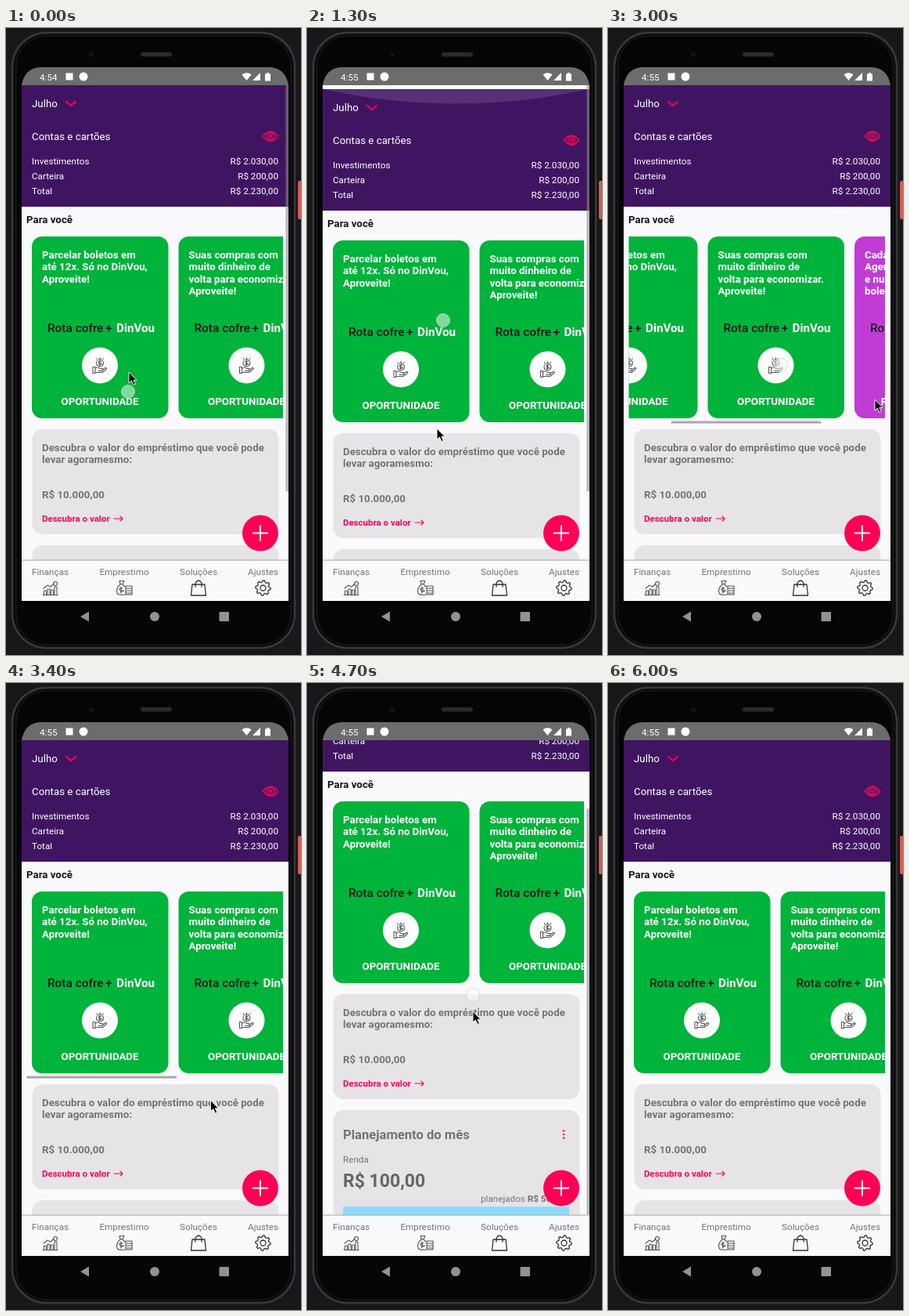
Recreate the animation shown at these times as an HTML page. Size 377x800 px, loop 6100 ms.

```html
<!DOCTYPE html>
<html lang="pt">
<head>
<meta charset="utf-8">
<style>
html, body { margin: 0; height: 100%; overflow: hidden; background: #19171a; }
svg { display: block; width: 100vw; height: 100vh; }
text { font: 11.7px Roboto, sans-serif; fill: #747474; white-space: pre; }
.white text { fill: #fff; }
.m { font-size: 13.3px; }
.b, .card text { font-size: 13.3px; font-weight: 700; }
.card text { fill: #fff; }
.card .brand { font-size: 15.2px; }
.card .dark { font-size: 15.4px; font-weight: 500; fill: #14181a; }
.mid { text-anchor: middle; }
.end { text-anchor: end; }
.line { fill: none; stroke: #555; stroke-width: 1.1; stroke-linejoin: round; stroke-linecap: round; }
.pink { stroke: #f05; }
</style>
</head>
<body>
<svg viewBox="0 0 377 800">
  <defs>
    <clipPath id="page"><rect x="20" y="73" width="341" height="606"/></clipPath>
    <clipPath id="strip"><rect x="26.5" y="260" width="327.5" height="250"/></clipPath>
    <g id="hand" class="line">
      <circle cy="-3" r="4.5"/>
      <path d="M0-10V-8M-4-9V-8M4-9V-8M1.5-5Q-1.5-6-1.5-4T1.5-2T-1.5-1M0-6V0M-9 2h3v8h-3zM-6 4Q-2 1 0 4h3q2 2-1 3h-4M3 6l4-3q3 0 1 2L3 9H-6"/>
    </g>
  </defs>

  <!-- phone body -->
  <rect x="373" y="195" width="6" height="49" rx="2" fill="#d65a56"/>
  <rect x="8" y="6" width="361" height="785" rx="44" fill="#0c0b0d" stroke="#39383b" stroke-width="2.5"/>
  <rect x="13" y="10" width="351" height="777" rx="39" fill="#050506" stroke="#1d1c1f"/>
  <rect x="172" y="31" width="40" height="5.5" rx="2.7" fill="#2a292b"/>
  <circle cx="109" cy="34" r="3" fill="#121215"/>

  <!-- screen -->
  <path d="M20 80V73Q24 50 46 50H335Q357 50 361 73V80z" fill="#6c6c6c"/>
  <g clip-path="url(#page)">
    <rect x="20" y="73" width="341" height="606" fill="#faf9fc"/>
    <g id="content">
      <g class="white">
        <rect x="20" y="73" width="341" height="155" fill="#3f1562"/>
        <text x="33" y="101" class="m">Julho</text>
        <path d="M77 94l6 5 6-5" class="line pink" style="stroke-width:2"/>
        <text x="33" y="143" class="m">Contas e cartões</text>
        <g class="line pink" style="stroke-width:1.5">
          <path d="M328.500 138Q338 126 347.500 138Q338 150 328.500 138z"/>
          <circle cx="338" cy="138" r="4.500"/><circle cx="338" cy="138" r="1.500"/>
        </g>
        <g id="rows"></g>
      </g>
      <text x="26" y="249" class="b" style="fill:#16161a">Para você</text>
      <g clip-path="url(#strip)"><g id="cards"></g></g>
      <rect id="hbar" y="501.500" width="191.500" height="3" fill="#a9a9ab"/>

      <g fill="#e6e4e7">
        <rect x="33.500" y="512" width="315" height="134" rx="13"/>
        <rect x="33.500" y="660" width="315" height="200" rx="13"/>
      </g>
      <text x="46" y="539.500" class="b">Descubra o valor do empréstimo que você pode</text>
      <text x="46" y="555" class="b">levar agoramesmo:</text>
      <text x="46" y="599.500" class="b">R$ 10.000,00</text>
      <text x="46" y="629.500" class="b" style="font-size:11.5px;fill:#f05">Descubra o valor</text>
      <path d="M138 626h11m-3-3l3 3-3 3" class="line pink"/>

      <text x="46" y="697" class="b" style="font-size:16.600px">Planejamento do mês</text>
      <g fill="#f05"><circle cx="328" cy="686.500" r="1.300"/><circle cx="328" cy="691" r="1.300"/><circle cx="328" cy="695.500" r="1.300"/></g>
      <text x="46" y="727">Renda</text>
      <text x="46" y="758" class="b" style="font-size:23px;fill:#666">R$ 100,00</text>
      <text x="222" y="777">planejados <tspan font-weight="700">R$ 500,00</tspan></text>
      <rect x="46" y="783" width="289" height="20" fill="#8edbfb"/>
    </g>
    <path id="glow" d="M20 78H361Q190 115 20 78z" fill="#fff" opacity=".12"/>
    <rect id="vbar" x="357.500" width="3.500" height="518" fill="#8a8a8e" opacity=".6"/>
  </g>

  <!-- status bar -->
  <g class="white" fill="#fff">
    <text id="clock" x="43" y="66.500" font-weight="500"></text>
    <rect x="76.500" y="57.500" width="9" height="9"/>
    <circle cx="99" cy="62" r="5.500"/>
    <path d="M301.500 59.500Q307.500 55 313.500 59.500L307.500 67zM325 57V67H315z"/>
    <path d="M331 58.500h2v-1.500h3v1.500h2V67.500h-7z"/>
  </g>

  <!-- floating button and tab bar -->
  <circle cx="325" cy="644.500" r="23" fill="#f05"/>
  <path d="M315 644.500h20M325 634.500v20" stroke="#fff" stroke-width="2"/>
  <rect x="20" y="679" width="341" height="52" fill="#faf9fc"/>
  <path d="M20 679H361" stroke="#a5a5a8"/>
  <g id="tabs" class="mid"></g>
  <g class="line">
    <path d="M47 723.500h19M48.500 723v-5h3v5M53 723v-7h3v7M57.500 723v-6h3v6M62 723v-10h3v10M48 715l5-4 4 2 4-4"/>
    <circle cx="63" cy="709" r="2.500"/>
    <path d="M145 705.500h6l-2 4h-3zM146 710q-6 5-4 11q1 3 10 2M149 710l3 3M147 713v8m2-6q-4-1-4 1t4 2t-3 1.500"/>
    <path d="M153 712h8v11h-8zM153 715h8M153 718h8M153 721h8"/>
  </g>
  <g class="line" style="stroke:#333;stroke-width:1.300">
    <path d="M238 710h16l1.500 14h-19zM242 713v-5q4-6 8 0v5"/>
    <circle cx="328.500" cy="714.500" r="3.500"/>
    <path id="gear"/>
  </g>
  <g fill="#929292">
    <path d="M95 751l11-6.500v13z"/><circle cx="190" cy="751" r="6"/><rect x="272.500" y="745" width="12.500" height="12" rx="1"/>
  </g>

  <circle id="touch" r="8.500" fill="#fff" fill-opacity=".5" stroke="#c9d6cf" stroke-opacity=".8"/>
  <path id="cursor" d="M0 0V14L3.300 11L6 16.500L8.300 15.500L5.800 10.300H10z" fill="#000" stroke="#fff" stroke-width=".9"/>
</svg>
<script>
const $ = id => document.getElementById(id);
const LOOP = 6100, STEP = 100;

$('rows').innerHTML = [['Investimentos', '2.030'], ['Carteira', '200'], ['Total', '2.230']].map(([name, sum], i) =>
  `<text x="33" y="${174 + i * 18.8}">${name}</text><text x="348" y="${174 + i * 18.8}" class="end">R$ ${sum},00</text>`).join('');

$('tabs').innerHTML = [[56.5, 'Finanças'], [151, 'Emprestimo'], [246, 'Soluções'], [328.5, 'Ajustes']].map(([x, name]) =>
  `<text x="${x}" y="698">${name}</text>`).join('');

const GREEN = '#00b33b';
$('cards').innerHTML = [
  [GREEN, 'OPORTUNIDADE', 'Parcelar boletos em|até 12x. Só no DinVou,|Aproveite!'],
  [GREEN, 'OPORTUNIDADE', 'Suas compras com|muito dinheiro de|volta para economizar.|Aproveite!'],
  ['#c03cd5', 'RECOMENDAÇÃO', 'Cadastre sua|Agenda, seja avisado|e nunca mais perca|boletos'],
].map(([color, label, copy], i) => `<g class="card" transform="translate(${33 + i * 187.5} 266)">
  <rect width="174.5" height="232" rx="13" fill="${color}"/>
  ${copy.split('|').map((line, n) => `<text x="13" y="${27.5 + n * 15.6}">${line}</text>`).join('')}
  <text x="20" y="122" class="dark">Rota cofre</text><text x="94" y="122" class="dark">+</text>
  <text x="108" y="122" class="brand">DinVou</text>
  <circle cx="87" cy="164.500" r="23" fill="#fff"/><use href="#hand" x="87" y="164.500"/>
  <text x="87" y="215" class="mid">${label}</text></g>`).join('');

// eight-toothed gear outline
$('gear').setAttribute('d', 'M' + Array.from({ length: 32 }, (_, i) => {
  const a = i * Math.PI / 16, r = i % 4 < 2 ? 9.7 : 7.5;
  return `${328.5 + r * Math.cos(a)} ${714.5 + r * Math.sin(a)}`;
}).join('L') + 'z');

// keys: [time, ...values]
const scrollKeys = [[0, 0], [100, 40], [300, 116], [1000, 116], [1200, 25], [1300, -5], [1400, -3], [1500, 0],
  [3500, 0], [3700, 85], [3800, 116], [4600, 116], [4700, 115], [4900, 30], [5000, 0]];
const swipeKeys = [[2000, 0], [2300, 128.5], [2500, 234], [2800, 234], [3000, 93], [3200, 0]];
const cursorKeys = [[-100, 156, 464], [0, 157, 439], [300, 156, 330], [700, 165, 290], [1000, 174, 270], [1200, 174, 373],
  [1300, 166, 511], [1600, 240, 460], [1900, 300, 415], [2200, 172, 414], [2300, 57, 417], [2700, 81, 425],
  [2900, 221, 430], [3000, 341, 474], [3300, 270, 530], [3500, 253, 535], [3700, 252, 419], [3800, 251, 378],
  [4100, 235, 365], [4500, 212, 390], [4600, 212, 398], [4700, 212, 419], [5000, 214, 560], [5500, 390, 640]];
const presses = [[0, 400], [1100, 1500], [2000, 2400], [2800, 3200], [3500, 3900], [4600, 5000]];

const within = (t, spans) => spans.some(([a, b]) => t >= a && t < b);

function at(keys, t) {
  const next = keys.findIndex(k => k[0] > t);
  if (next < 1) return (next ? keys[keys.length - 1] : keys[0]).slice(1);
  const a = keys[next - 1], b = keys[next], f = (t - a[0]) / (b[0] - a[0]);
  return a.slice(1).map((v, i) => v + (b[i + 1] - v) * f);
}

const move = (id, x, y) => $(id).setAttribute('transform', `translate(${x} ${y})`);
const show = (id, on) => $(id).style.display = on ? '' : 'none';

function draw(t) {
  const [scroll] = at(scrollKeys, t), [swipe] = at(swipeKeys, t);
  move('content', 0, -scroll);
  move('cards', -swipe, 0);
  $('hbar').setAttribute('x', 26.5 + swipe * .584);
  $('vbar').setAttribute('y', 73 + Math.max(0, scroll) * 88 / 116);
  show('hbar', within(t, [[2000, 4000]]));
  show('vbar', within(t, [[0, 1800], [3500, 5500]]));
  show('glow', scroll < 0);
  $('clock').textContent = t < 700 ? '4:54' : '4:55';
  move('cursor', ...at(cursorKeys, t));
  move('touch', ...at(cursorKeys, t - 100)); // the touch dot trails the pointer
  show('touch', within(t, presses));
}

const start = performance.now();
function tick() {
  const t = (performance.now() - start) % LOOP;
  draw(Math.floor(t / STEP) * STEP);
  requestAnimationFrame(tick);
}
tick();
</script>
</body>
</html>
```
